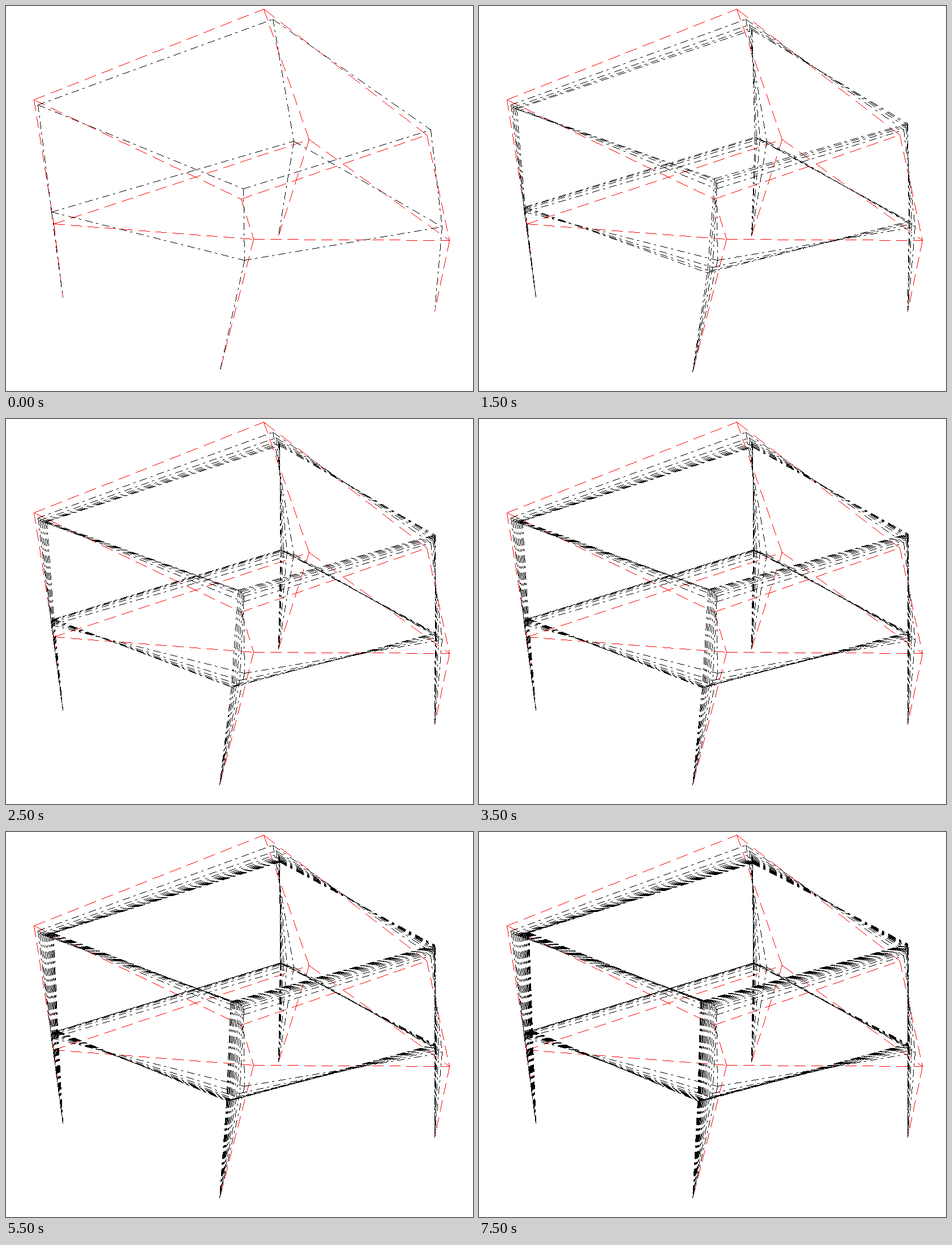
Recreate the animation shown at these times as a matplotlib script. Size 825 px wide and 679 px high, loop 8 s.

```python
import numpy as np
import matplotlib.pyplot as plt
from matplotlib.animation import FuncAnimation
from matplotlib.colors import ListedColormap

W, H, DPI = 825, 679, 100
STEPS, INTERVAL = 16, 500
WHITE, RED, BLACK = range(3)
FAST, SLOW = 0.5, 0.9     # share of each motion left after one step
DASH = (20, 10)           # on, off lengths in pixels
DASH_DOT = (13, 6, 4, 7)


def pose(*xy):
    return np.reshape(xy, (-1, 2)).astype(float)


# Each pose: roof, then middle ring, as left, back, right, front.
feet = pose(100, 513, 481, 405, 757, 538, 377, 645)
rest = pose(49, 165, 455, 5, 743, 227, 415, 340,
            84, 384, 535, 235, 783, 413, 437, 411)
first = pose(56, 174, 471, 23, 750, 218, 419, 322,
             80, 363, 508, 238, 770, 389, 421, 448)
early = pose(66, 181, 482, 42, 757, 207, 416, 304,
             81, 354, 487, 231, 759, 379, 403, 470)
late = pose(88, 177, 483, 55, 757, 197, 391, 298,
            94, 350, 484, 231, 757, 373, 386, 474)

RING = [(0, 1), (1, 2), (3, 2), (0, 3)]
EDGES = RING + [(a + 4, b + 4) for a, b in RING]
EDGES += [(i, i + 4) for i in range(8)]


def settle(n):
    """Progress of the quick and of the slow motion after n steps."""
    return 1 - FAST ** n, 1 - SLOW ** n


# Split the motion so that it passes early at step 3 and late at the end.
shifts = np.array([early - first, late - first]).reshape(2, -1)
quick, slow = np.linalg.solve([settle(3), settle(STEPS - 1)],
                              shifts).reshape(2, 8, 2)


def joints(n):
    q, s = settle(n)
    return first + q * quick + s * slow


def draw_line(canvas, start, end, pattern, ink):
    """One pixel wide line, dashes counted along its longer axis."""
    span = int(round(np.abs(end - start).max()))
    i = np.arange(span + 1)
    points = start + np.outer(i / span, end - start)
    x, y = np.floor(points + 0.5).astype(int).T
    part = np.searchsorted(np.cumsum(pattern), i % sum(pattern), side="right")
    on = part % 2 == 0
    canvas[y[on], x[on]] = ink


def draw_frame(canvas, ring, pattern, ink):
    points = np.vstack([ring, feet])
    for a, b in EDGES:
        draw_line(canvas, points[a], points[b], pattern, ink)


canvas = np.full((H, W), WHITE, np.uint8)
draw_frame(canvas, rest, DASH, RED)
trail = []
for n in range(STEPS):
    draw_frame(canvas, joints(n), DASH_DOT, BLACK)
    trail.append(canvas.copy())

fig = plt.figure(figsize=(W / DPI, H / DPI), dpi=DPI, facecolor="white")
ax = fig.add_axes([0, 0, 1, 1])
ax.axis("off")
image = ax.imshow(trail[0], cmap=ListedColormap(["white", "red", "black"]),
                  vmin=WHITE, vmax=BLACK, interpolation="nearest",
                  aspect="auto")


def update(n):
    image.set_data(trail[n])
    return [image]


anim = FuncAnimation(fig, update, frames=STEPS, interval=INTERVAL,
                     repeat=True, repeat_delay=0, blit=False)
plt.show()
```
